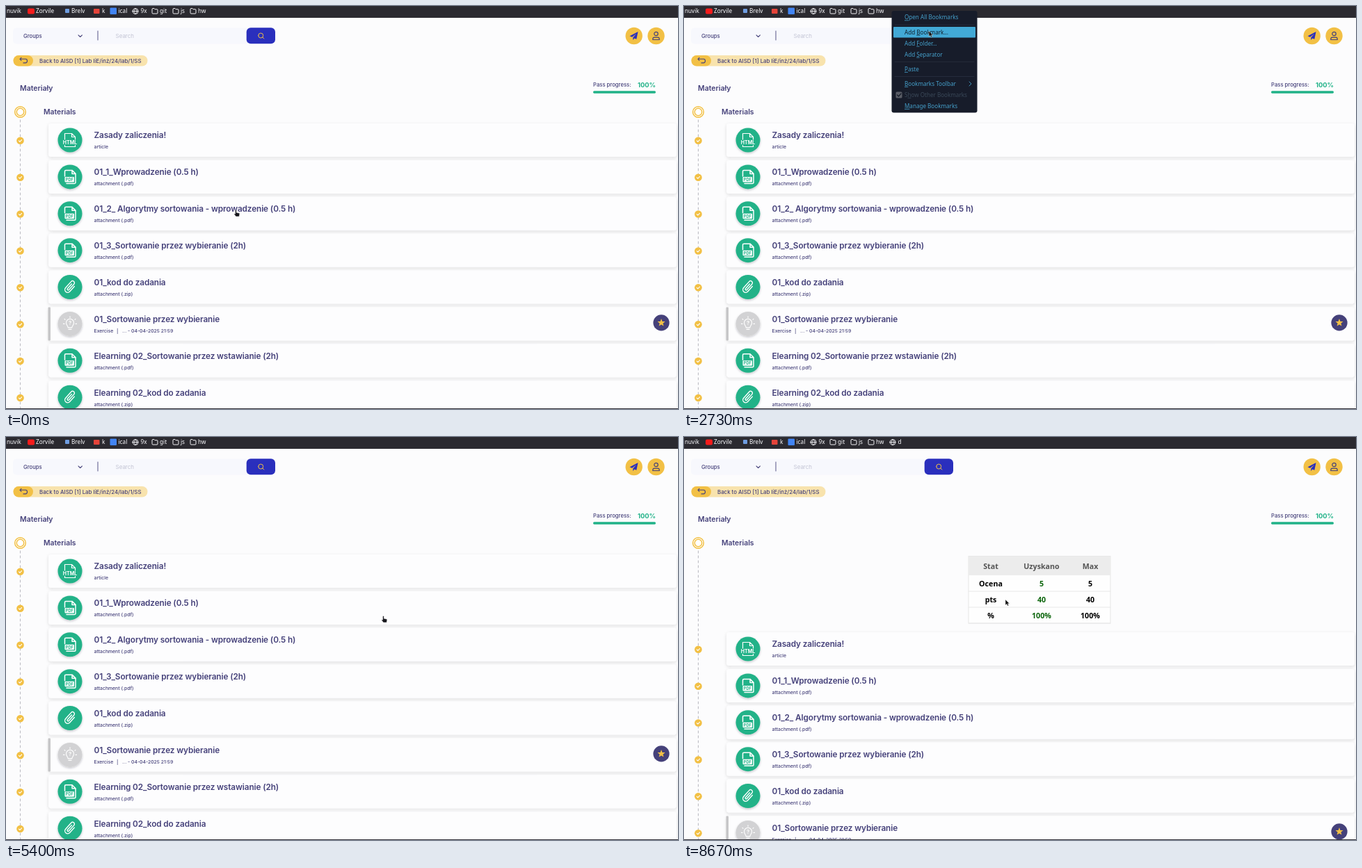
Animation, 966 px wide and 580 px high, one loop 8740 ms. Source, as an HTML page:

```html
<!DOCTYPE html>
<html lang="pl">
<head>
<meta charset="utf-8">
<title>Bookmarklet demo</title>
<style>
html, body { margin: 0; width: 100%; height: 100%; overflow: hidden; background: #fcfcfd; }
svg { display: block; width: 966px; height: 580px; }
text { white-space: pre; font-family: Inter, sans-serif; }
.ui { font-family: "Noto Sans", sans-serif; }
.mono { font-family: "Noto Sans Mono", monospace; }
.mid { text-anchor: middle; }
.end { text-anchor: end; }
.med { font-weight: 500; }
.semi { font-weight: 600; }
.bold { font-weight: 700; }
.title { font-weight: 600; letter-spacing: -.1px; }
.line { fill: none; stroke-linecap: round; stroke-linejoin: round; }
</style>
</head>
<body>
<svg id="stage" viewBox="0 0 966 580" xmlns="http://www.w3.org/2000/svg"></svg>
<script>
const LOOP = 8740;
const INK = '#45417a', GREEN = '#20b288', GOLD = '#f2c045', BLUE = '#2a2fbd';
const SKY = '#459fca', PALE = '#fbfbfe';

// Text is placed by its left edge and the middle of its capitals.
const text = (x, y, str, size, fill, cls = '', more = '') =>
  `<text x="${x}" y="${(y + size * .36).toFixed(2)}" font-size="${size}" fill="${fill}" class="${cls}" ${more}>${str}</text>`;
const box = (x, y, w, h, fill, r = 0, more = '') =>
  `<rect x="${x}" y="${y}" width="${w}" height="${h}" rx="${r}" fill="${fill}" ${more}/>`;
const disc = (x, y, r, fill, more = '') => `<circle cx="${x}" cy="${y}" r="${r}" fill="${fill}" ${more}/>`;
const line = (d, color, width = 1, more = '') =>
  `<path class="line" d="${d}" stroke="${color}" stroke-width="${width}" ${more}/>`;
const at = (x, y, body, id = '') => `<g ${id && `id="${id}"`} transform="translate(${x} ${y})">${body}</g>`;
const layer = (id, body) => `<g id="${id}" visibility="hidden">${body}</g>`;

// Browser bar
const globe = x => at(x, 7.5, line('M-4 0a4 4 0 1 0 8 0a4 4 0 1 0-8 0M-4 0H4M0-4C-2.4-1.5-2.4 1.5 0 4C2.4 1.5 2.4-1.5 0-4', PALE, .9));
const folder = x => line(`M${x} 4.5q0-1 1-1h2l1 1.2h3q1 0 1 1v4.3q0 1-1 1h-6q-1 0-1-1z`, PALE, .95);
const label = (x, str) => text(x, 7.5, str, 8.2, PALE, 'ui');
const browserBar = box(0, 0, 966, 17, '#2b2a30') +
  label(1, 'nuvik') + box(31, 3.5, 10, 8, '#f61c1c', 2) + label(43, 'Zorvile') +
  box(85, 4, 6, 6, '#6f9de0', 1) + label(94, 'Brelv') +
  box(126, 4, 8.5, 7, '#e5443a', 1) + label(138, 'k') +
  box(149.5, 2.5, 9.5, 9.5, '#4285f4', 1) + label(161.5, 'ical') +
  globe(186) + label(193.5, '9x') +
  [[210, 'git'], [240, 'js'], [265, 'hw']].map(([x, s]) => folder(x) + label(x + 11, s)).join('') +
  layer('bookmark', box(293, 1, 23, 13, '#4b4a55', 2, 'id="bookmarkHover"') + globe(300) + label(307.5, 'd'));

// Page header
const header = box(10, 31.5, 340, 23, '#f7f8fd', 5) +
  text(25, 43, 'Groups', 7.7, INK, 'med') + line('M104 41.8l2.7 2.7l2.7-2.7', INK, 1.1) +
  line('M132 36V49', INK, .9) + text(157.5, 43.5, 'Search', 8, '#c3c4d4') +
  box(345.7, 31.3, 41.3, 22.9, BLUE, 6) +
  line('M362.7 42.5a3.5 3.5 0 1 0 7 0a3.5 3.5 0 1 0-7 0M368.8 45l2 2', GOLD, 1) +
  disc(902.7, 43, 12.2, GOLD) + disc(934.5, 43, 12.2, GOLD) +
  `<path d="M908.5 37L896.5 43.2L900 44.8L906 40L901.3 45.5V49L903.3 46.4L906.3 47.7Z" fill="${BLUE}"/>` +
  line('M931.8 40a2.7 2.7 0 1 0 5.4 0a2.7 2.7 0 1 0-5.4 0M929.8 48.5v-1q0-2.3 2.3-2.3h4.8q2.3 0 2.3 2.3v1z', INK, 1.2) +
  box(10.5, 71, 193, 15.5, '#f8e3ad', 7.7) + box(10.5, 71, 28.5, 15.5, GOLD, 7.7) +
  line('M20 76.3H28q2.5 0 2.5 2.8t-2.5 2.8H25M22 74.3l-2 2l2 2', INK, 1.1) +
  text(48, 79, 'Back to AISD [1] Lab IiE/inż/24/lab/1/SS', 7.85, INK, 'med') +
  text(20, 118, 'Materiały', 10.5, INK, 'semi') +
  text(844, 113.5, 'Pass progress:', 7.7, INK, 'med') +
  text(934, 113.5, '100%', 9.3, GREEN, 'bold end') + box(844, 122.3, 90, 3.4, GREEN, 1.6) +
  line('M20.5 164V580', '#b9b9c0', 1, 'stroke-dasharray="3 4" stroke-linecap="butt"') +
  disc(20.5, 152.5, 7.8, '#fff', `stroke="${GOLD}" stroke-width="1.5"`) +
  disc(20.5, 152.5, 5.2, '#fff', `stroke="${GOLD}" stroke-width="1.5"`) +
  text(54, 152, 'Materials', 10.4, INK, 'semi');

// Course list
const sheet = 'M-7.5-1V-8q0-1.5 1.5-1.5H3L8-4.5V8q0 1.5-1.5 1.5H-5';
const icons = {
  html: line('M-7.5-1V-9.5H2.5L7.5-4.5V-1M2.5-9.5V-4.5H7.5M-7.5 7.5V9.5H7.5V7.5', '#fff', 1.2) +
    text(0, 3.3, 'HTML', 7, '#fff', 'bold mid'),
  pdf: line(sheet + 'M3-9.5V-4.5H8', '#fff', 1.5) + box(-7.5, 0, 13.5, 7.5, '#fff', 1) +
    text(-.7, 3.9, 'PDF', 5.6, GREEN, 'bold mid'),
  zip: line('M4-5V5a4 4 0 0 1-8 0V-7a2.7 2.7 0 0 1 5.4 0V4a1.3 1.3 0 0 1-2.6 0V-5', '#fff', 1.4, 'transform="rotate(42)"'),
  task: line('M-2.8 5.5C-2.8 3-5.5 2-5.5-1.5a5.5 5.5 0 0 1 11 0C5.5 2 2.8 3 2.8 5.5zM-2 8H2M0-10.5V-9M-8-7l1 1M8-7l-1 1M-9.5 0H-8M9.5 0H8', '#fff', 1.1) +
    text(0, -1, '?', 7.5, '#fff', 'bold mid')
};
const rows = [
  ['html', 'Zasady zaliczenia!'],
  ['pdf', '01_1_Wprowadzenie (0.5 h)'],
  ['pdf', '01_2_ Algorytmy sortowania - wprowadzenie (0.5 h)'],
  ['pdf', '01_3_Sortowanie przez wybieranie (2h)'],
  ['zip', '01_kod do zadania'],
  ['task', '01_Sortowanie przez wybieranie'],
  ['pdf', 'Elearning 02_Sortowanie przez wstawianie (2h)'],
  ['zip', 'Elearning 02_kod do zadania']
];
const starPoints = [...Array(10).keys()].map(i => {
  const r = i % 2 ? 2.5 : 5.8, a = i * Math.PI / 5;
  return `${(r * Math.sin(a)).toFixed(2)},${(-r * Math.cos(a)).toFixed(2)}`;
}).join(' ');
const note = (x, str) => text(x, 10, str, 6.85, INK, 'med');
const subtitle = kind => kind === 'task'
  ? note(126.5, 'Exercise') + note(159, '|') + note(167, '... - 04-04-2025 21:59')
  : note(126.5, kind === 'html' ? 'article' : `attachment (.${kind})`);
const row = ([kind, name], i) => at(0, 193 + i * 52.88,
  box(61, -24, 903, 48, '#fdfdfe', 4, 'filter="url(#soft)"') +
  (kind === 'task' ? box(60.5, -24, 3.5, 48, '#c6c6c8', 1) +
    at(942, -1.5, disc(0, 0, 11.6, INK) + `<polygon points="${starPoints}" fill="${GOLD}"/>`) : '') +
  disc(20.5, .8, 5.3, GOLD) + line('M18.4 .9l1.5 1.5l2.7-2.8', '#fff', 1.1) +
  disc(92, 0, 17.5, kind === 'task' ? '#d2d2d4' : GREEN, 'filter="url(#round)"') + at(92, 0, icons[kind]) +
  text(126.5, -6.9, name, 11.78, INK, 'title') + subtitle(kind));

// Score table
const scores = [['Ocena', '5'], ['pts', '40'], ['%', '100%']];
const cell = (x, y, str, fill) => text(x, y, str, 10.7, fill, 'ui bold mid');
const table = box(409, 171.5, 204, 96.5, '#fefefe', 0, 'stroke="#e6e6e6"') + box(409, 171.5, 204, 27.5, '#ececec') +
  ['Stat', 'Uzyskano', 'Max'].map((s, i) => cell([441, 514, 584][i], 186, s, '#555')).join('') +
  scores.map(([name, n], i) => {
    const y = 210.8 + 23 * i;
    return line(`M409 ${y + 11.2}H613`, '#e8e8e8') + cell(441, y, name, '#000') + cell(514, y, n, '#0a640a') + cell(584, y, n, '#000');
  }).join('');

// Text editor
const code = 'ableWidth}px`; } else if (toggleTable) { toggleTable.remove(); } }; updateTable(); })(); void 0;';
const menuNames = [[131, 'Файл'], [161, 'Правка'], [199, 'Поиск'], [233, 'Просмотр'], [282, 'Документ'], [331, 'Помощь']];
const editor = box(123, 191, 549.5, 331.5, '#10131c', 2, 'filter="url(#deep)"') +
  box(127, 228, 541.5, 290.5, '#001a2e') + box(127, 228, 14, 290.5, '#00131f') +
  box(127.5, 195, 10, 11, '#eee', 1) + line('M130.5 203.5l5-5', '#333', 1.5) +
  text(377, 200.5, '~/Documents/git/uni/uafm_agc/pagc.bookmarklet.txt - Mousepad', 8, SKY, 'ui bold mid') +
  line('M618.5 202l2.5-2.5l2.5 2.5M632.5 203.5h5M646.5 198h5v5h-5zM660.5 198l5 5M665.5 198l-5 5', '#7fc0e4', 1.2) +
  menuNames.map(([x, s]) => text(x, 218.5, s, 8, SKY, 'ui')).join('') +
  text(134, 235.5, '1', 9.1, '#3b7da0', 'mono') +
  box(141, 229, 526.5, 13, '#0d86ea', 0, 'id="selection"') +
  text(142, 235.5, code, 9.1, '#eaf6ff', 'mono') + box(644, 515, 24, 2, '#14607a');

// Bookmarks menu
const menuItems = [[16.5, 'Open All Bookmarks', 0], [37.8, 'Add Bookmark...', 4], [53.8, 'Add Folder...', 4],
  [69.8, 'Add Separator', 4], [91, 'Paste', 0], [112, 'Bookmarks Toolbar', 0], [128, 'Show Other Bookmarks', 1], [144, 'Manage Bookmarks', 0]];
const FADED = '#3a4858';
const accel = (s, i) => `${s.slice(0, i)}<tspan text-decoration="underline">${s[i]}</tspan>${s.slice(i + 1)}`;
const menu = box(298.5, 7, 123, 146.5, '#171c2a', 3) +
  line('M303 27.2H417M303 80.3H417M303 101.5H417', '#2a3040', .8) +
  box(301, 30, 118, 15.5, '#42a9d6', 1, 'id="menuHover"') +
  menuItems.map(([y, s, k], i) => text(317, y, accel(s, k), 8.1, i === 6 ? FADED : SKY, 'ui', 'data-item')).join('') +
  line('M410 109l3 3l-3 3', SKY, .9) + box(304.5, 123.5, 9, 9, '#5a5d66', 1.5) + line('M306.5 128l2 2l3.5-4', '#171c2a', 1.2);

// Bookmark dialog
const field = (y, w = 304, id = '') => box(261, y, w, 18.5, '#23222c', 2, `stroke="#8f8f9d" stroke-width=".8" ${id}`);
const dlg = (x, y, s, size = 8.1, cls = '', more = '') => text(x, y, s, size, PALE, 'ui ' + cls, more);
const dialog = box(251, 14, 323.5, 263, '#42414d', 4, 'filter="url(#deep)"') +
  at(265.7, 28.5, `<polygon points="${starPoints}" transform="scale(.8)" fill="none" stroke="${PALE}" stroke-width="1.1"/>`) +
  dlg(273, 28.5, 'Add bookmark', 8, 'bold') +
  dlg(261, 51, accel('Name', 0)) + field(59.5, 304, 'id="nameField"') +
  box(264.5, 63, 59.5, 11.5, '#3ba6c6', 0, 'id="nameMark"') + dlg(265, 69, 'New Bookmark', 8.1, '', 'id="nameText"') +
  dlg(261, 94.5, accel('URL', 0)) + field(102.5, 304, 'id="urlField"') +
  layer('urlText', `<svg x="263" y="103" width="299" height="18" style="width:299px;height:18px">${text(297, 9, code, 8.1, PALE, 'ui end')}</svg>`) +
  dlg(261, 137, accel('Tags', 0)) + field(145, 275) + text(265, 154.5, 'Separate tags with commas', 8.1, '#a8a8b2', 'ui') +
  box(545.5, 145, 19.5, 18.5, '#55545f', 2) + line('M551.5 153l3.8 3.6l3.8-3.6', PALE, 1.1) +
  text(263, 171.8, 'Use tags to organize and search for bookmarks from the address bar', 7.3, '#cfcfd6', 'ui') +
  dlg(261, 195.5, accel('Keyword', 0)) + field(203.5) +
  text(263, 230.3, 'Use a single keyword to open bookmarks directly from the address bar', 7.3, '#cfcfd6', 'ui') +
  box(480, 248, 44, 19.5, '#55545f', 2) + dlg(502, 258, 'Cancel', 8.1, 'bold mid') +
  box(529, 248, 36, 19.5, '#22809a', 2, 'id="saveBox"') +
  text(547, 258, 'Save', 8.1, '#223a4a', 'ui bold mid');

const status = 'nts = 0, totalPercentage = 0, taskCount = 0, includeUnscoredTasks = false, tableWidth = 0; const updateTable =...Table.style.display = "table"; ' +
  'toggleTable.style.width = `${tableWidth}px`; } else if (toggleTable) { toggleTable.remove(); } }; updateTable(); })(); void';

const pointers = {
  hand: '<path d="M-1.5-4q1-1 1.8 0V-.8l3.7 .8q1 .3 .8 1.5l-.6 3.5h-4.7l-2.7-3.5q.2-1 1.7-.3z" fill="#16161c" stroke="#fff" stroke-width=".5"/>',
  arrow: '<path d="M0 0V8L1.9 6.3L3.1 9L4.6 8.3L3.4 5.7H5.8Z" fill="#111" stroke="#ddd" stroke-width=".5"/>',
  beam: line('M-2-4.5Q0-4.5 0-3.5Q0-4.5 2-4.5M0-3.5V4M-2 5Q0 5 0 4Q0 5 2 5', '#fff', 1.1)
};

const shadow = (id, dy, blur, alpha) =>
  `<filter id="${id}" x="-15%" y="-20%" width="130%" height="145%"><feDropShadow dx="0" dy="${dy}" stdDeviation="${blur}" flood-color="#223" flood-opacity="${alpha}"/></filter>`;

stage.innerHTML = `<defs>${shadow('soft', 1.5, 2.2, .13)}${shadow('round', 1.5, 1.8, .25)}${shadow('deep', 1, 2, .3)}</defs>` +
  box(0, 0, 966, 580, '#fcfcfd') + header + at(0, 0, rows.map(row).join(''), 'list') + layer('scores', table) +
  box(0, 579, 966, 1, '#33323a') +
  layer('veil', box(0, 17, 966, 563, '#221c14', 0, 'opacity=".065"') +
    box(407, 145.5, 81, 15, '#f5fdfa', 0, 'opacity=".7"') + box(490, 76, 476, 14, '#f5fdfa', 0, 'opacity=".3"')) +
  layer('shade', box(0, 17, 966, 563, '#1c1b22', 0, 'opacity=".45"')) + browserBar +
  layer('editor', editor) + layer('menu', menu) + layer('dialog', dialog) +
  layer('status', box(0, 568, 966, 12, '#10131b') + text(0, 574.5, status, 8.1, SKY, 'ui')) +
  at(0, 0, Object.entries(pointers).map(([k, v]) => layer(k, v)).join(''), 'pointer');

// layer: start, end, fade in, fade out
const spans = {
  veil: [930, 1930, 100, 130], editor: [930, 1930, 100, 130], menu: [2070, 2830, 60, 40],
  shade: [2870, 5300, 100, 70], dialog: [2870, 5300, 70, 70], urlText: [4600, 5300, 0, 0],
  bookmark: [5530, LOOP, 0, 0], scores: [6530, LOOP, 0, 0], status: [6330, 7050, 0, 60]
};
// time, x, y, pointer shape from then on
const path = [
  [0, 331, 298, 'hand'], [300, 345, 285, 'hand'], [900, 420, 250, 'beam'], [1350, 420, 250, 'arrow'],
  [1730, 297, 5, 'arrow'], [2130, 298, 7, 'arrow'], [2600, 352, 36, 'arrow'], [2830, 352, 36, 'arrow'],
  [3000, 383, 110, 'beam'], [4650, 383, 110, 'arrow'], [5050, 543, 259, 'arrow'], [5300, 543, 262, 'hand'],
  [5530, 543, 262, 'hand'], [5900, 430, 125, 'arrow'], [6350, 311, 8, 'arrow'], [6850, 311, 8, 'arrow'],
  [7350, 455, 190, 'arrow'], [8100, 462, 234, 'arrow'], [LOOP, 462, 234, 'arrow']
];

const $ = id => document.getElementById(id);
const items = [...document.querySelectorAll('[data-item]')];
const set = (id, attrs) => { for (const k in attrs) $(id).setAttribute(k, attrs[k]); };
const clamp = v => Math.max(0, Math.min(1, v));
const ease = v => v * v * (3 - 2 * v);

function pointerAt(t) {
  const i = path.findIndex((p, n) => t < path[n + 1][0]);
  const [t0, x0, y0, shape] = path[i], [t1, x1, y1] = path[i + 1];
  const k = ease((t - t0) / (t1 - t0));
  return { x: x0 + (x1 - x0) * k, y: y0 + (y1 - y0) * k, shape };
}

function render(t) {
  for (const [id, [a, b, fadeIn, fadeOut]] of Object.entries(spans)) {
    const on = t >= a && t < b;
    const alpha = Math.min(fadeIn ? clamp((t - a) / fadeIn) : 1, fadeOut ? clamp((b - t) / fadeOut) : 1);
    set(id, { visibility: on ? 'inherit' : 'hidden', opacity: alpha });
  }
  set('list', { transform: `translate(0 ${t >= 6530 ? 112 : 0})` });
  set('selection', { opacity: t >= 1170 ? 1 : 0 });

  const { x, y, shape } = pointerAt(t);
  set('pointer', { transform: `translate(${x.toFixed(2)} ${y.toFixed(2)})` });
  for (const k in pointers) set(k, { visibility: k === shape ? 'visible' : 'hidden' });
  set('bookmarkHover', { opacity: x < 318 && y < 16 ? 1 : 0 });

  const hot = x > 301 ? menuItems.findIndex(([my]) => Math.abs(my - y) < 8) : -1;
  set('menuHover', { opacity: hot < 0 ? 0 : 1, y: hot < 0 ? 30 : menuItems[hot][0] - 7.8 });
  items.forEach((el, i) => el.setAttribute('fill', i === hot ? '#10202e' : i === 6 ? FADED : SKY));

  const typed = t >= 3670, inUrl = t >= 4130, ready = t >= 4600;
  const focus = on => ({ stroke: on ? '#00ddff' : '#8f8f9d', 'stroke-width': on ? 1.6 : .8 });
  set('nameField', focus(!inUrl));
  set('urlField', focus(inUrl));
  set('nameMark', { opacity: typed ? 0 : 1 });
  set('nameText', { fill: typed ? PALE : '#1c2b38' });
  $('nameText').textContent = typed ? 'd' : 'New Bookmark';
  set('saveBox', { fill: ready ? '#00ddff' : '#22809a' });
}

function tick() {
  render(performance.now() % LOOP);
  requestAnimationFrame(tick);
}
tick();
</script>
</body>
</html>
```
